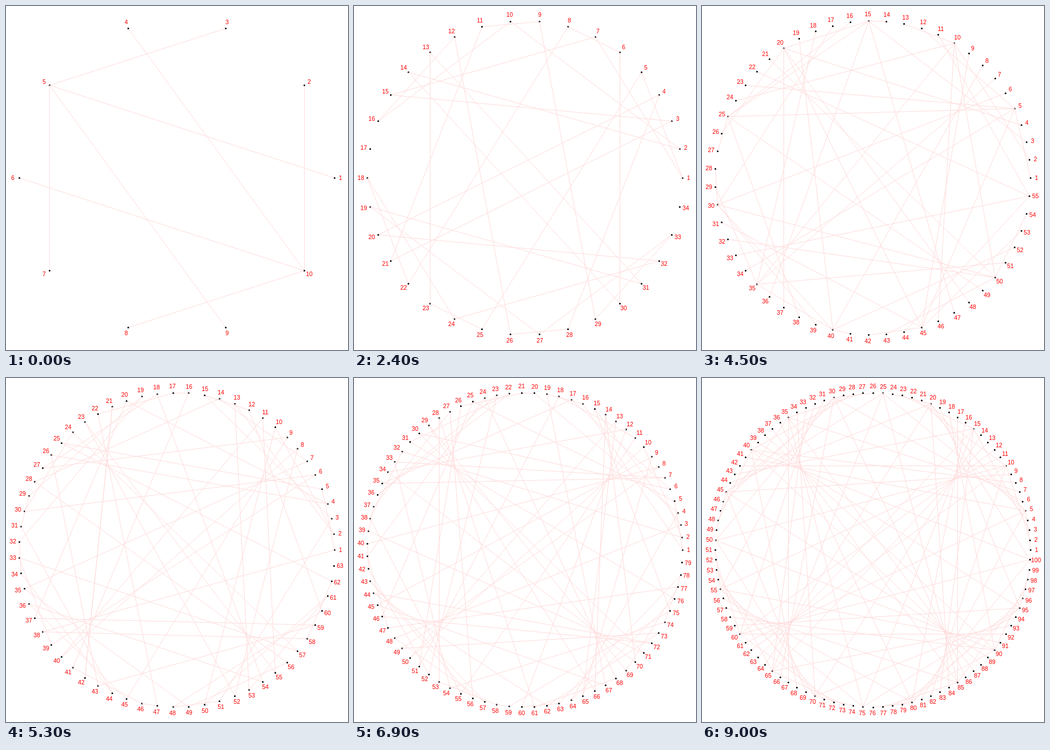
Write an HTML page that moves like this. It is 600 px wide and 605 px high and loops after 9100 ms.

```html
<!DOCTYPE html>
<html lang="en">
<head>
<meta charset="utf-8">
<title>Times five on a circle</title>
<style>
  html, body { margin: 0; width: 100%; height: 100%; overflow: hidden; background: #fff; }
  svg { display: block; width: 600px; height: 605px; }
  line { stroke: #ffdcdc; stroke-width: 1; }
  text { fill: #f00; font: 10.5px "Liberation Sans", Arial, sans-serif; text-anchor: middle; }
</style>
</head>
<body>
<svg id="stage" viewBox="0 0 600 605"></svg>
<script>
const FIRST = 10, LAST = 100, STEP_MS = 100, FACTOR = 5;
const STEPS = LAST - FIRST + 1;
const stage = document.getElementById('stage');

// Point 1 sits at the right; numbering runs anticlockwise.
function onCircle(number, count, cx, cy, radius) {
  const angle = (number - 1) / count * 2 * Math.PI;
  return [cx + radius * Math.cos(angle), cy - radius * Math.sin(angle)];
}

function dotAt(number, count) {
  return onCircle(number, count, 300, 302.5, 276.5).map(v => Math.floor(v + 1e-6) + 0.5);
}

function drawPoint(number, count) {
  const target = (number * FACTOR) % count || count;
  const [x, y] = dotAt(number, count);
  const [tx, ty] = dotAt(target, count);
  const [lx, ly] = onCircle(number, count, 299.5, 302.2, 287.5);
  // Later chords run over the dots already drawn.
  return `<line x1="${x}" y1="${y}" x2="${tx}" y2="${ty}"/>` +
    `<circle cx="${x}" cy="${y}" r="1.5"/>` +
    `<text x="${Math.round(lx)}" y="${Math.round(ly + 3.5)}">${number}</text>`;
}

let shown = 0;
function render(time) {
  const count = FIRST + Math.floor(Math.max(0, time) / STEP_MS) % STEPS;
  if (count === shown) return;
  shown = count;
  stage.innerHTML = Array.from({ length: count }, (_, i) => drawPoint(i + 1, count)).join('');
}

const start = performance.now();
function tick() {
  render(performance.now() - start);
  requestAnimationFrame(tick);
}
tick();
</script>
</body>
</html>
```
